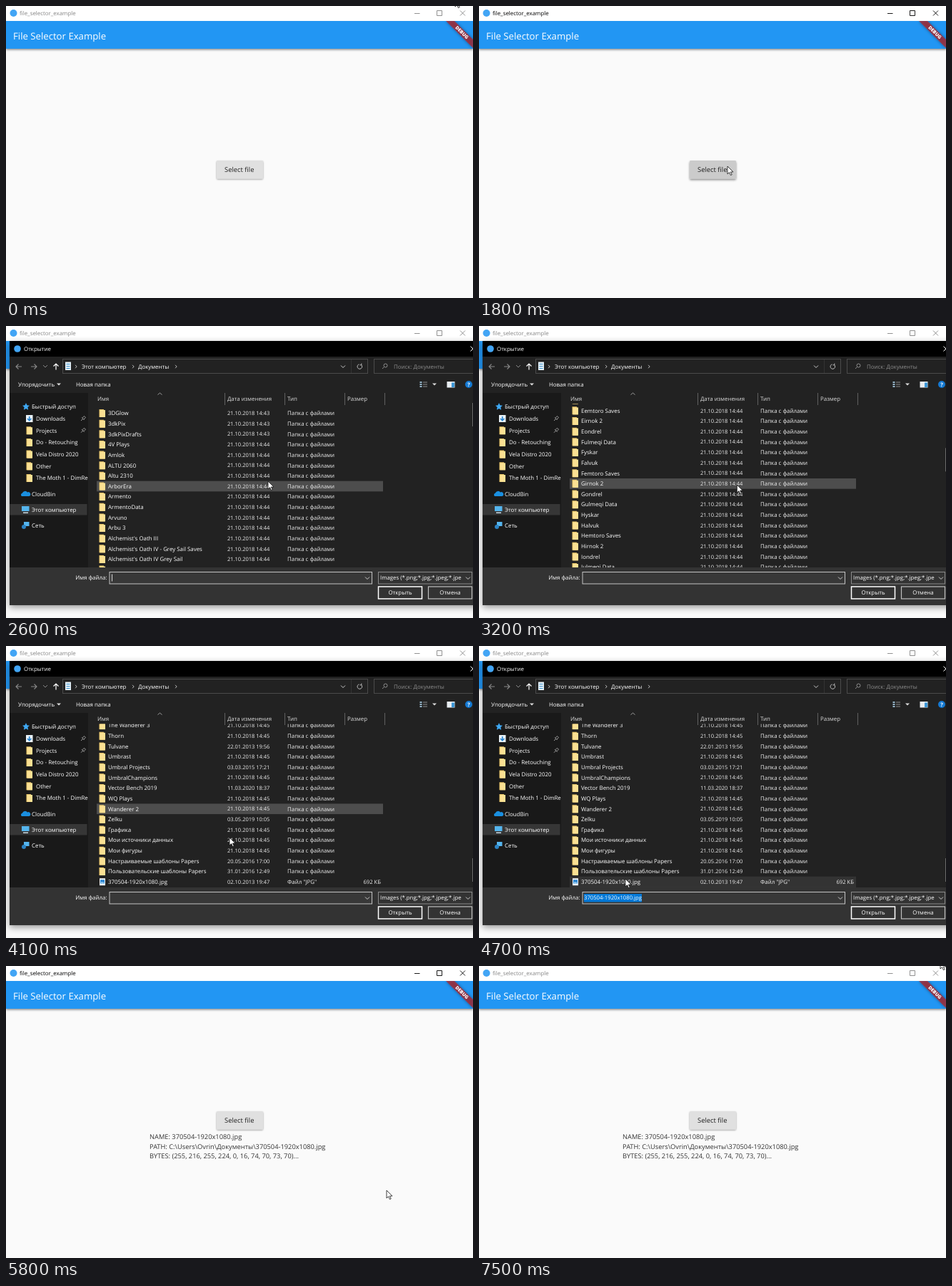
Write an HTML page that moves like this. It is 654 by 410 pixels and loops after 7600 ms.

```html
<!DOCTYPE html>
<html lang="ru">
<head>
<meta charset="utf-8">
<title>File selector</title>
<style>
  html, body { margin: 0; width: 100%; height: 100%; overflow: hidden; background: #fafafa; }
  svg { display: block; width: 100vw; height: 100vh; }
  text { font-family: "Open Sans", "Noto Sans", sans-serif; white-space: pre; text-rendering: geometricPrecision; }
</style>
</head>
<body>
<svg id="stage" viewBox="0 0 654 410"></svg>
<script>
const LOOP = 7600, STEP = 100;
const ROW = 14.64, FIRST_ROW = 122.5, LAST_ROW = 331.2, ROWS = 100;
const MAX_SCROLL = FIRST_ROW + (ROWS - 1) * ROW - LAST_ROW;
const FILE = '370504-1920x1080.jpg';

// Markup helpers; text is centred vertically on y
const text = (x, y, str, size = 7.9, fill = '#fff', extra = '') =>
  `<text x="${x}" y="${y + size * 0.36}" font-size="${size}" fill="${fill}" ${extra}>${str}</text>`;
const rect = (x, y, w, h, fill, extra = '') =>
  `<rect x="${x}" y="${y}" width="${w}" height="${h}" fill="${fill}" ${extra}/>`;
const line = (d, stroke = '#fff', width = 1, extra = '') =>
  `<path d="${d}" fill="none" stroke="${stroke}" stroke-width="${width}" ${extra}/>`;
const shape = (d, fill) => `<path d="${d}" fill="${fill}"/>`;
const frame = (x, y, w, h, stroke, fill = 'none', width = 1, extra = '') =>
  rect(x, y, w, h, fill, `stroke="${stroke}" stroke-width="${width}" ${extra}`);
const chevron = (x, y, color = '#ccc') => line(`M${x - 3} ${y - 1.5}l3 3l3 -3`, color);
const crumb = (x, y) => line(`M${x - 1} ${y - 2.2}l2.2 2.2l-2.2 2.2`, '#ccc', 0.9);
const triangle = (x, y) => shape(`M${x - 3} ${y - 1.5}h6l-3 3z`, '#ddd');
const folder = (x, y) =>
  shape(`M${x + 0.5} ${y - 5.5}h6.5v2h1.5v9h-8z`, '#e9c566') + rect(x + 1.5, y - 4.5, 7.5, 10, '#fbe093');
const picture = (x, y) =>
  rect(x + 1, y - 5, 8, 10, '#f4f8fc') + rect(x + 2, y - 3, 6, 5.5, '#2d87d3') +
  shape(`M${x + 2} ${y + 2.5}l2 -3l1.5 1.5l1 -1l1.5 2.5z`, '#a7d4f2');

function windowPage() {
  const ribbon = 'M616 21H628L654 47V59Z';
  return rect(0, 0, 654, 410, '#fafafa') +
    rect(0, 21, 654, 39, '#2196f3', 'filter="url(#barShadow)"') +
    text(10, 42, 'File Selector Example', 13.2) +
    `<g clip-path="url(#content)"><path d="${ribbon}" fill="#b71c1c" fill-opacity=".68" filter="url(#ribbonShadow)"/>
      <g transform="translate(638.5 37) rotate(45)">${
        text(0, 0, 'DEBUG', 6.6, '#fff', 'text-anchor="middle" font-weight="800"')}</g></g>` +
    rect(0, 0, 654, 21, '#fff') +
    '<circle cx="10.5" cy="10" r="5" fill="#42a5f5"/>' +
    `<g id="caption">${text(19, 10.5, 'file_selector_example', 7.9, 'currentColor')}` +
    line('M572 10.5h7.5M603.5 6.5h7v7h-7zM636 6.5l7 7M643 6.5l-7 7', 'currentColor', 0.9) + '</g>' +
    `<g id="button">${rect(295, 217, 65, 25.5, '#e0e0e0', 'id="buttonFace" rx="1.4"')}` +
    text(306, 230, 'Select file', 9.4, '#202020') + '</g>' +
    '<g id="result">' + [
      'NAME: ' + FILE,
      'PATH: C:\\Users\\Ovrin\\Документы\\' + FILE,
      'BYTES: (255, 216, 255, 224, 0, 16, 74, 70, 73, 70)...'
    ].map((s, i) => text(201, 240 + i * 13.2, s, 9.3, '#333')).join('') + '</g>';
}

function fileNames() {
  const head = ['3DGlow', '3dkPix', '3dkPixDrafts', '4V Plays', 'Amlok', 'ALTU 2060', 'Altu 2310',
    'ArborEra', 'Armento', 'ArmentoData', 'Arvuno', 'Arbu 3', "Alchemist's Oath III",
    "Alchemist's Oath IV - Grey Sail Saves", "Alchemist's Oath IV Grey Sail"];
  const tail = ['The Wanderer 3', 'Thorn', 'Tulvane', 'Umbrast', 'Umbral Projects', 'UmbralChampions',
    'Vector Bench 2019', 'WQ Plays', 'Wanderer 2', 'Zelku', 'Графика', 'Мои источники данных',
    'Мои фигуры', 'Настраиваемые шаблоны Papers', 'Пользовательские шаблоны Papers', FILE];
  const endings = ['alvuk', 'emtoro Saves', 'irnok 2', 'ondrel', 'ulmeqi Data', 'yskar'];
  const count = ROWS - head.length - tail.length;
  const middle = Array.from({ length: count }, (_, k) =>
    String.fromCharCode(66 + Math.floor(k * 18 / count)) + endings[k % endings.length]);
  return [...head, ...middle, ...tail];
}

function fileRows() {
  const dates = { 86: '22.01.2013 19:56', 88: '03.03.2015 17:21', 90: '11.03.2020 18:37',
    93: '03.05.2019 10:05', 97: '20.05.2016 17:00', 98: '31.01.2016 12:49', 99: '02.10.2013 19:47' };
  return fileNames().map((name, i) => {
    const y = FIRST_ROW + i * ROW, isFile = i === ROWS - 1;
    const date = dates[i] || '21.10.2018 14:4' + (i < 3 ? 3 : i < 45 ? 4 : 5);
    return (isFile ? picture : folder)(130, y) + text(143, y, name) +
      text(310, y, date, 7.5, '#eee') +
      text(394, y, isFile ? 'Файл "JPG"' : 'Папка с файлами', 7.9, '#eee') +
      (isFile ? text(525, y, '692 КБ', 7.7, '#eee', 'text-anchor="end"') : '');
  }).join('');
}

function sidebar() {
  const pin = y => line(`M105 ${y + 3}l3 -3M106 ${y - 1.5}l3.5 3.5M107 ${y - 1}l2.5 -2.5l2 2l-2.5 2.5`, '#aaa', 0.9);
  const places = ['Downloads', 'Projects', 'Do - Retouching', 'Vela Distro 2020', 'Other', 'The Moth 1 - DimReels'];
  return rect(5, 94, 110, 245, '#191919') +
    shape('M28 108l1.5 3.3l3.5 .4l-2.6 2.4l.7 3.6l-3.1 -1.8l-3.1 1.8l.7 -3.6l-2.6 -2.4l3.5 -.4z', '#3fa9f5') +
    text(36, 113, 'Быстрый доступ') +
    places.map((name, i) => {
      const y = 130 + i * 16.7;
      const icon = i ? folder(28, y)
        : rect(28, y - 5, 9.5, 10, '#e9f2f8') + line(`M32.7 ${y - 3}v5.5M30 ${y}l2.7 2.7l2.7 -2.7`, '#1d7fd0', 1.5);
      return icon + text(42, y, name) + (i < 2 ? pin(y) : '');
    }).join('') +
    shape('M22 239a2.5 2.5 0 0 1 1 -4.5a4 4 0 0 1 7 -1a3 3 0 0 1 2.5 5.5z', '#1a8fe0') +
    text(36, 236, 'CloudBin') +
    rect(5, 250, 108.5, 15.5, '#363636') +
    rect(22, 253, 10.5, 7, '#55b5ee') + rect(24, 261.5, 7, 1.5, '#c8dce8') + text(36, 258, 'Этот компьютер') +
    rect(25, 275, 7.5, 6, '#55b5ee') + '<circle cx="25" cy="282" r="3" fill="#2c83c4"/>' + text(36, 280, 'Сеть');
}

function dialog() {
  const centered = 'text-anchor="middle"';
  return rect(5, 21, 657, 371, '#202020', 'filter="url(#dialogShadow)"') +
    rect(5, 21, 657, 22, '#000') +
    '<circle id="dialogIcon" cx="16" cy="32" r="4.8" fill="#42a5f5"/>' + text(25, 32, 'Открытие', 7.9, '#fff', 'id="dialogTitle"') +
    line('M650.5 28.5l7 7M657.5 28.5l-7 7') +
    // navigation row
    line('M22 57h-8M17.5 53.5l-3.5 3.5l3.5 3.5M35 57h8M39.5 53.5l3.5 3.5l-3.5 3.5', '#8a8a8a', 1.1) +
    chevron(55, 56.5, '#888') +
    line('M70 61.5v-8.5M66.5 56.5l3.5 -3.5l3.5 3.5', '#fff', 1.2) +
    frame(79.5, 46.5, 427, 20, '#4b4b4b') +
    rect(83, 50.5, 8, 11.5, '#e4eff6') + line('M84.5 53.5h5M84.5 56.5h5M84.5 59.5h5', '#3c93cf') +
    crumb(98, 57) + text(106, 57, 'Этот компьютер') +
    crumb(178, 57) + text(185, 57, 'Документы') + crumb(238, 57) +
    chevron(472, 57) + line('M483.5 47v19', '#333') +
    line('M497.5 54.5a3.3 3.3 0 1 1 -3 -.7M497.8 52.5v2.3h-2.3', '#ccc', 0.9) +
    frame(515.5, 46.5, 146, 20, '#4b4b4b') +
    line('M527 60l2.3 -2.3M529 55.5a2.5 2.5 0 1 1 5 0a2.5 2.5 0 1 1 -5 0', '#999', 0.9) +
    text(543, 57, 'Поиск: Документы', 7.9, '#8c8c8c') +
    // command row
    text(17, 82, 'Упорядочить') + triangle(74, 82) + text(98, 82, 'Новая папка') +
    [79, 82, 85].map(y => rect(579.5, y - 0.9, 3, 1.8, '#a5c8de') + rect(584, y - 0.4, 6, 0.8, '#aaa')).join('') +
    triangle(600, 82) + rect(617.5, 78, 11, 8.5, '#e9eef2') + rect(624, 79.5, 4, 6.5, '#3d97d8') +
    '<circle cx="648" cy="82" r="5" fill="#1479d3"/>' + text(648, 82, '?', 7.5, '#fff', centered + ' font-weight="700"') +
    // column headings
    text(128, 102, 'Имя', 7.9, '#ddd') + text(310, 102, 'Дата изменения', 7.8, '#ddd') +
    text(394, 102, 'Тип', 7.9, '#ddd') + text(478, 102, 'Размер', 7.9, '#ddd') +
    line('M306.5 94v17M390.5 94v17M474.5 94v17M530.5 94v17', '#606060') +
    line('M212.5 96.5l3 -2.5l3 2.5', '#aaa', 0.9) +
    `<g clip-path="url(#sidebarArea)">${sidebar()}</g>` +
    `<g clip-path="url(#listArea)">${rect(127, 0, 401, ROW, '#4d4d4d', 'id="hover"')}${
      rect(127, LAST_ROW - ROW / 2, 401, ROW, '#333', 'id="selected"')}<g id="rows">${fileRows()}</g></g>` +
    rect(653, 108, 8, 33, '#6a6a6a', 'id="thumb"') + line('M655 102l2.5 -2.5l2.5 2.5', '#aaa') +
    // footer
    rect(5, 339, 657, 53, '#333') +
    text(141.5, 353, 'Имя файла:', 7.9, '#fff', 'text-anchor="end"') +
    frame(145, 345.5, 367.5, 16.5, '#c4c4c4', '#383838') + chevron(506, 354) +
    line('M148.5 348.5v10', '#eee', 0.9, 'id="caret"') +
    `<g id="fileName">${rect(147, 348, 81, 11.5, '#0078d7')}${text(147, 353.5, FILE, 7.7)}</g>` +
    frame(521.5, 345.5, 131, 16.5, '#8a8a8a', '#333') +
    text(524, 353.5, 'Images (*.png;*.jpg;*.jpeg;*.jpe', 7.8) + chevron(647, 354) +
    frame(521.5, 366, 61, 17, '#fff', '#333', 1.5, 'id="open"') + text(552, 374.5, 'Открыть', 7.9, '#fff', centered) +
    frame(591.5, 366, 61, 17, '#c0c0c0', '#333', 1.2) + text(622, 374.5, 'Отмена', 7.9, '#fff', centered);
}

const shadow = (id, dy, blur, alpha) =>
  `<filter id="${id}" x="-20%" y="-50%" width="140%" height="200%"><feDropShadow dx="0" dy="${dy}" stdDeviation="${blur}" flood-opacity="${alpha}"/></filter>`;
const clip = (id, x, y, w, h) => `<clipPath id="${id}">${rect(x, y, w, h, '#000')}</clipPath>`;

document.getElementById('stage').innerHTML = '<defs>' +
  shadow('barShadow', 1.5, 1.6, 0.45) + shadow('ribbonShadow', 0, 2, 0.6) + shadow('dialogShadow', 3, 5, 0.4) +
  shadow('buttonShadow', 1, 0.9, 0.4) + shadow('raisedShadow', 1.8, 1.5, 0.45) +
  clip('content', 0, 21, 654, 389) + clip('sidebarArea', 5, 94, 110, 245) + clip('listArea', 116, 109.5, 536, 229.5) +
  '</defs>' + windowPage() + `<g id="dialog">${dialog()}</g>` +
  '<path id="cursor" d="M0 0V11L2.6 8.6L4.4 12.6L6.2 11.8L4.4 8H8Z" fill="#fff" stroke="#111" stroke-width=".8"/>';

const el = Object.fromEntries([...document.querySelectorAll('#stage [id]')].map(e => [e.id, e]));
const show = (e, on) => e.setAttribute('display', on ? 'inline' : 'none');
const clamp = v => Math.max(0, Math.min(1, v));
const smooth = k => k * k * (3 - 2 * k);

// Interpolates keys of the form [time, ...values]
function track(keys, t, ease = k => k) {
  const next = keys.findIndex(key => key[0] > t);
  if (next < 0) return keys[keys.length - 1].slice(1);
  if (next === 0) return keys[0].slice(1);
  const a = keys[next - 1], b = keys[next], k = ease((t - a[0]) / (b[0] - a[0]));
  return a.slice(1).map((v, i) => v + (b[i + 1] - v) * k);
}

const cursorKeys = [[0, 629, -10], [800, 380, 207], [1100, 348, 225], [2200, 348, 225], [2400, 357, 222],
  [2600, 367, 218], [2800, 367, 222], [4000, 345, 226], [4100, 313, 269], [4400, 205, 327], [4700, 205, 327],
  [5200, 531, 378], [5600, 535, 379], [5800, 533, 315], [6000, 533, 310], [6800, 600, 77], [7500, 646, -7]];
// time, opacity, scale
const dialogKeys = [[2200, 0, 0.95], [2300, 0.3, 0.965], [2400, 0.67, 0.981], [2500, 0.93, 0.994], [2600, 1, 1],
  [5500, 1, 1], [5600, 0.985, 1], [5700, 0.4, 0.97], [5800, 0, 0.95]];

function render(t) {
  const [x, y] = track(cursorKeys, t, smooth);
  el.cursor.setAttribute('transform', `translate(${x} ${y})`);

  const active = (t >= 1800 && t < 2200) || (t >= 5600 && t < 6800);
  el.caption.setAttribute('color', active ? '#000' : '#858585');

  const done = t >= 5700, over = t >= 1000 && t < 5700, pressed = t >= 1200 && t < 5700;
  el.button.setAttribute('transform', `translate(0 ${done ? -13 : 0})`);
  el.buttonFace.setAttribute('fill', pressed ? '#cbcbcb' : over ? '#d6d6d6' : '#e0e0e0');
  el.buttonFace.setAttribute('filter', `url(#${over ? 'raisedShadow' : 'buttonShadow'})`);
  show(el.result, done);

  const [opacity, scale] = track(dialogKeys, t);
  show(el.dialog, opacity > 0);
  el.dialog.setAttribute('opacity', opacity);
  el.dialog.setAttribute('transform', `translate(330 200) scale(${scale}) translate(-330 -200)`);
  show(el.dialogIcon, t < 5600);
  el.dialogTitle.setAttribute('x', t < 5600 ? 25 : 11);

  const progress = clamp((t - 2800) / 1200), scroll = progress * MAX_SCROLL;
  el.rows.setAttribute('transform', `translate(0 ${-scroll})`);
  el.thumb.setAttribute('y', 108 + progress * 190);

  // The highlighted row lags behind the pointer until the wheel has come to rest
  const pointerY = t < 4200 ? 226 : y, top = FIRST_ROW - ROW / 2;
  const row = Math.floor((pointerY - top + scroll) / ROW);
  el.hover.setAttribute('y', top + row * ROW - scroll);
  show(el.hover, pointerY < 339);

  const chosen = t >= 4600;
  show(el.selected, chosen);
  show(el.fileName, chosen);
  show(el.caret, !chosen && (t + 840) % 1060 < 530);
  el.open.setAttribute('fill', t >= 5400 ? '#666' : t >= 5200 ? '#454545' : '#333');
}

function tick(now) {
  render(Math.floor(now % LOOP / STEP) * STEP);
  requestAnimationFrame(tick);
}
render(0);
requestAnimationFrame(tick);
</script>
</body>
</html>
```
